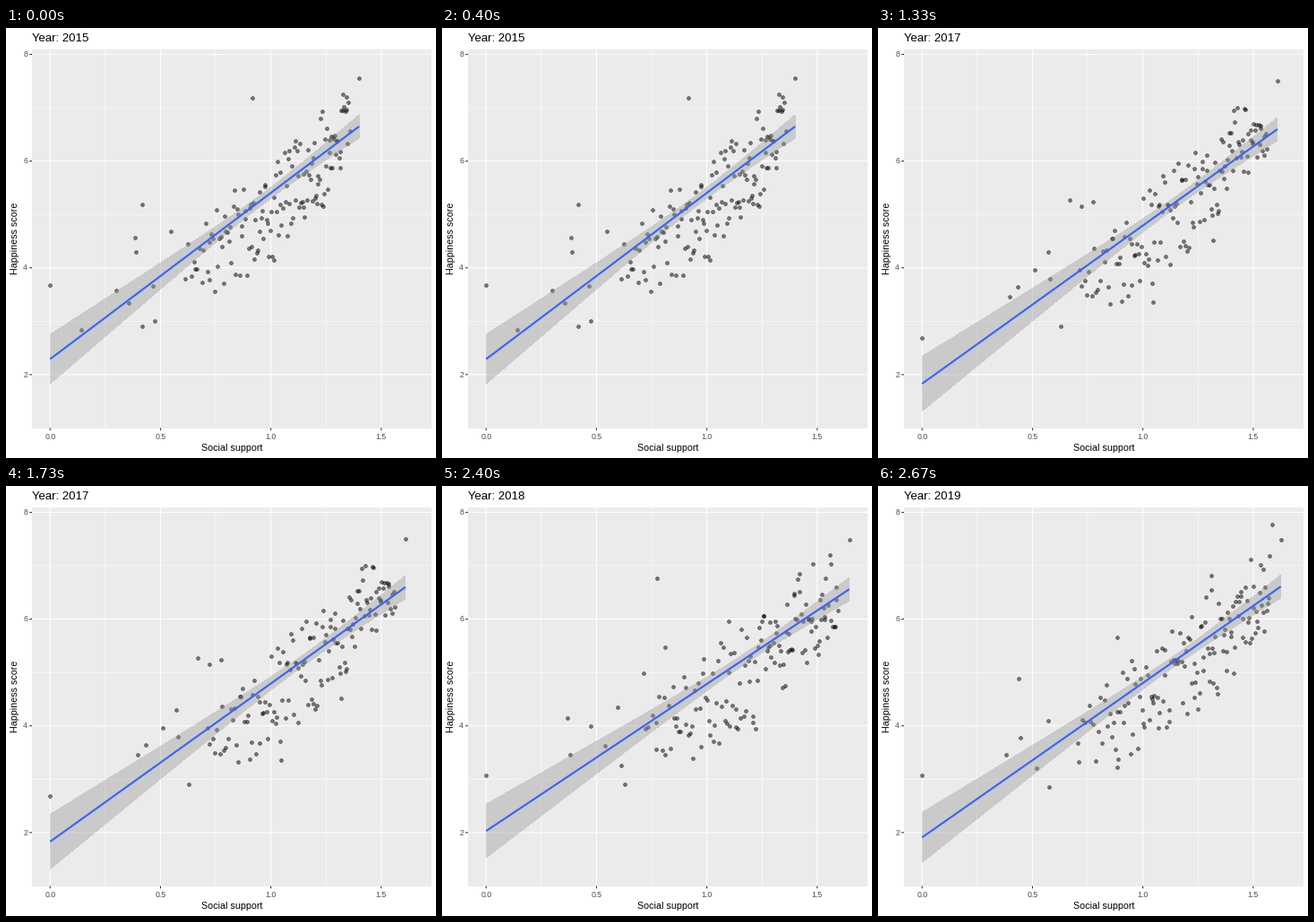
Animation of 480 by 480 pixels, one loop 3330 ms. Source, as a matplotlib script:

```python
import numpy as np
import matplotlib.pyplot as plt
from matplotlib.animation import FuncAnimation
from matplotlib.patches import Polygon, Rectangle

SIZE, DPI = 480, 100
PX = 72 / DPI  # points per pixel
LOOP, STEP = 3330, 10
CHANGES = [670, 1330, 2000, 2670]

LEFT, RIGHT, TOP, BOTTOM = 29, 474.5, 24, 446.5
CLOUD_SIZE = 142

plt.rcParams["font.family"] = "Liberation Sans"


def x_px(support):
    return 49.25 + 246.4 * support


def y_px(score):
    return 506.04 - 59.58 * score


def to_px(support, score):
    return np.column_stack([x_px(support), y_px(score)])


class Year:
    """One year's scatter and regression, in stage pixels."""

    def __init__(self, year, start, end, half_left, loners):
        loners = np.array(loners)
        self.title = f"Year: {year}"
        self.x_end = loners[:, 0].max()
        self.start, self.end = start, end

        x = np.linspace(0, self.x_end, 80)
        fit = self.fit(x)
        half = self.half_width(x / self.x_end, half_left)
        self.line = to_px(x, fit).T
        self.band = np.vstack([to_px(x, fit + half), to_px(x, fit - half)[::-1]])
        self.points = np.vstack([to_px(*loners.T),
                                 to_px(*self.cloud(np.random.default_rng(year)))])

    def fit(self, x):
        return self.start + (self.end - self.start) * x / self.x_end

    @staticmethod
    def half_width(u, left, mid=0.1, right=0.215):
        """Hyperbolic band, narrowest at the mean of the data."""
        a, b = np.sqrt(left**2 - mid**2), np.sqrt(right**2 - mid**2)
        return np.sqrt(mid**2 + ((a + b) * u - a) ** 2)

    def cloud(self, rng):
        """Points around the fit, denser to the right and skewed downward."""
        s = ((np.arange(CLOUD_SIZE) + rng.random(CLOUD_SIZE)) / CLOUD_SIZE) ** 0.75
        x = self.x_end * (0.43 + 0.54 * s)
        above = 0.4 + 0.65 * s
        below = 0.6 + 0.9 * np.sin(np.pi * s)
        v = rng.beta(1.4, 1.4, CLOUD_SIZE)
        return x, self.fit(x) - below + (above + below) * v


# Fit start, fit end, band half width at zero, and the points far from the cloud.
years = [
    Year(2015, 2.29, 6.65, 0.46,
         [(0, 3.68), (0.14, 2.84), (0.3, 3.57), (0.355, 3.34), (0.385, 4.57),
          (0.39, 4.29), (0.415, 5.19), (0.415, 2.9), (0.475, 3), (0.465, 3.66),
          (0.545, 4.68), (0.915, 7.19), (1.4, 7.56)]),
    Year(2016, 2.86, 6.61, 0.37,
         [(0, 3.31), (0.105, 3.49), (0.147, 4.16), (0.15, 3.07), (0.235, 2.9),
          (0.26, 5.14), (0.335, 5.44), (0.31, 3.6), (0.295, 4.4),
          (0.385, 5.15), (0.46, 3.7), (0.715, 6.78), (1.18, 7.5)]),
    Year(2017, 1.83, 6.6, 0.51,
         [(0, 2.69), (0.395, 3.46), (0.435, 3.65), (0.51, 3.97), (0.57, 4.29),
          (0.58, 3.8), (0.63, 2.9), (0.67, 5.27), (0.72, 5.15), (0.775, 5.23),
          (1.045, 3.35), (1.61, 7.5)]),
    Year(2018, 2.03, 6.56, 0.5,
         [(0, 3.08), (0.37, 4.14), (0.38, 3.46), (0.475, 4), (0.54, 3.63),
          (0.595, 4.34), (0.63, 2.9), (0.61, 3.25), (0.715, 4.98),
          (0.775, 6.77), (0.81, 5.47), (1.1, 5.96), (1.645, 7.49)]),
    Year(2019, 1.91, 6.61, 0.465,
         [(0, 3.08), (0.38, 3.46), (0.437, 4.88), (0.447, 3.77), (0.52, 3.2),
          (0.57, 4.09), (0.575, 2.85), (0.71, 3.33), (0.885, 3.23),
          (0.885, 5.65), (1.31, 6.82), (1.587, 7.77), (1.625, 7.49)]),
]

fig = plt.figure(figsize=(SIZE / DPI, SIZE / DPI), dpi=DPI, facecolor="white")
ax = fig.add_axes([0, 0, 1, 1])
ax.set(xlim=(0, SIZE), ylim=(SIZE, 0))
ax.axis("off")


def segment(x, y, color, width, zorder=1):
    return ax.plot(x, y, color=color, lw=width * PX, zorder=zorder,
                   solid_capstyle="butt", snap=False)[0]


def label(x, y, text, size, color="black", **kw):
    kw = {"ha": "center", "va": "baseline", **kw}
    return ax.text(x, y, text, fontsize=size * PX, color=color, **kw)


ax.add_patch(Rectangle((LEFT, TOP), RIGHT - LEFT, BOTTOM - TOP,
                       fc="#EBEBEB", lw=0, zorder=0))
for v in (0.25, 0.75, 1.25):
    segment([x_px(v)] * 2, [TOP, BOTTOM], "white", 0.53)
for v in (3, 5, 7):
    segment([LEFT, RIGHT], [y_px(v)] * 2, "white", 0.53)
for v in (0, 0.5, 1, 1.5):
    x = x_px(v)
    segment([x, x], [TOP, BOTTOM], "white", 1.07)
    segment([x, x], [BOTTOM, BOTTOM + 2.75], "#333333", 1.07)
    label(x, 459.3, f"{v:.1f}", 8.8, "#4D4D4D")
for v in (2, 4, 6, 8):
    y = y_px(v)
    segment([LEFT, RIGHT], [y, y], "white", 1.07)
    segment([LEFT - 2.75, LEFT], [y, y], "#333333", 1.07)
    label(24, y + 2.7, str(v), 8.8, "#4D4D4D", ha="right")

label((LEFT + RIGHT) / 2, 472, "Social support", 10.6)
label(13, (TOP + BOTTOM) / 2, "Happiness score", 10.6, rotation=90,
      rotation_mode="anchor")
title = label(LEFT, 15, "", 13.2, ha="left")

# Fill and rim are both translucent, so each dot gets a darker edge.
dots = ax.scatter([], [], s=(3.92 * PX) ** 2, facecolors=[(0, 0, 0, 0.5)],
                  edgecolors=[(0, 0, 0, 0.5)], linewidths=0.71 * PX, zorder=2,
                  snap=False)
band = ax.add_patch(Polygon(years[0].band, fc="#999999", alpha=0.4, lw=0,
                            antialiased=False, zorder=3))
trend = segment([], [], "#3366FF", 2.13, zorder=4)


def update(frame):
    now = years[np.searchsorted(CHANGES, frame * STEP, side="right")]
    title.set_text(now.title)
    dots.set_offsets(now.points)
    band.set_xy(now.band)
    trend.set_data(*now.line)
    return title, dots, band, trend


anim = FuncAnimation(fig, update, frames=LOOP // STEP, interval=STEP,
                     repeat=True, repeat_delay=0)
plt.show()
```
